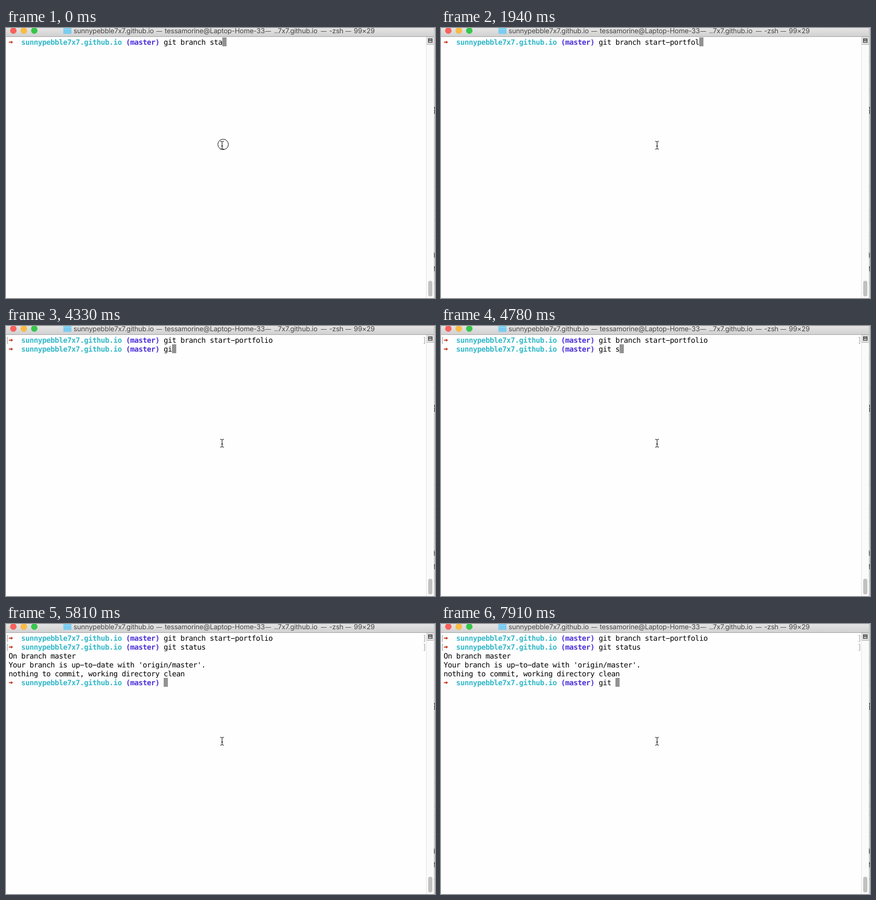
An HTML page that plays this animation: 819x516 px, repeating every 8 s.

```html
<!DOCTYPE html>
<html lang="en">
<head>
<meta charset="utf-8">
<title>Terminal session</title>
<style>
  html, body { margin: 0; width: 100%; height: 100%; overflow: hidden; background: #fefefe; }
  svg { display: block; width: 819px; height: 516px; }
  text { white-space: pre; text-rendering: geometricPrecision; }
  .title text { font: 13px Inter, Roboto, sans-serif; letter-spacing: -.14px; fill: #454545; }
  .title .dash { font-size: 11px; }
  .screen text { font: 14px "DejaVu Sans Mono", monospace; fill: #000; }
  .screen .dir { font-weight: bold; fill: #33b8c8; }
  .screen .git { font-weight: bold; fill: #4a2fd8; }
  .mark { fill: none; stroke: #999; }
</style>
</head>
<body>
<svg viewBox="0 0 819 516">
  <defs>
    <linearGradient id="bar" x2="0" y2="1">
      <stop stop-color="#e4e4e4"/><stop offset="1" stop-color="#d1d1d1"/>
    </linearGradient>
  </defs>
  <rect width="819" height="516" fill="#fefefe"/>

  <!-- sliver of the window behind -->
  <rect x="817" width="2" height="516" fill="#d9d9d9"/>
  <path d="M817.5 0V516" stroke="#b9b9b9"/>
  <path d="M818 64.5h1M818 117.5h1M818 303.5h1M818 349.5h1M818 366.5h1M818 397.5h1M818 405.5h1M818 487.5h1" stroke="#999"/>
  <path d="M817 151.5h2M818.5 152v4M817 157.5h2M818.5 158v5M817 163h2M817.5 429v9M817 433.5h2M817 438h2M817 457.5h2M818 455v10" stroke="#333" fill="none"/>

  <g class="title">
    <rect width="817" height="16" fill="url(#bar)"/>
    <path d="M0 16.5H817" stroke="#a4a4a4"/>
    <g stroke-width=".6">
      <circle cx="14" cy="5" r="5.8" fill="#fc605b" stroke="#e8544f"/>
      <circle cx="34" cy="5" r="5.8" fill="#fdbc40" stroke="#e8aa38"/>
      <circle cx="54" cy="5" r="5.8" fill="#34c84a" stroke="#2db53f"/>
    </g>
    <path d="M109.5 0H125V10Q125 11.2 123.8 11.2H110.7Q109.5 11.2 109.5 10Z" fill="#7accf0"/>
    <path d="M109.5 2.5H125" stroke="#9addf7"/>
  </g>

  <g>
    <path d="M802.5 17V516" stroke="#e3e3e3"/>
    <rect x="803" y="17" width="14" height="499" fill="#fafafa"/>
    <rect x="803" y="17" width="14" height="14" fill="#dedede"/>
    <path d="M803 31.5H817" stroke="#b8b8b8"/>
    <rect x="806.5" y="20.5" width="7" height="7" fill="#dedede" stroke="#222"/>
    <path d="M807 22.5H813M807 24.5H813" stroke="#222"/>
    <rect x="806" y="483" width="8" height="30" rx="4" fill="#c1c1c1"/>
  </g>

  <g class="screen"></g>

  <g fill="none" stroke="#000">
    <circle id="ring" cx="414.5" cy="222.5" r="10" fill="#fff"/>
    <path d="M409 216.5H410.5Q412.5 216.5 412.5 218.5V229.5Q412.5 231.5 410.5 231.5H409M416 216.5H414.5Q412.5 216.5 412.5 218.5M412.5 229.5Q412.5 231.5 414.5 231.5H416M411 225.5H414"/>
  </g>
</svg>
<script>
const LOOP = 8000, CELL = 8, ROW = 17, LEFT = 5, TOP = 18;
const PROMPT_COLS = 37;
const SITE = 'sunnypebble7x7.github.io';
const RING_UNTIL = 150;

const titleParts = [
  [129, SITE], [287, '—'], [303, 'tessamorine@Laptop-Home-33'], [495, '—'],
  [512, '..7x7.github.io'], [601, '—'], [617, '-zsh'], [648, '—'], [664, '99×29']
];

// keys: [time, typed characters]; enter: return pressed; done: next prompt shown
const commands = [
  { row: 0, text: 'git branch start-portfolio', shown: 0, enter: 2690, done: 2840, output: [],
    keys: [[0, 14], [150, 15], [300, 16], [450, 17], [1050, 18], [1200, 20], [1350, 21],
           [1650, 23], [1940, 24], [2090, 25], [2240, 26]] },
  { row: 1, text: 'git status', shown: 2840, enter: 5660, done: 5810,
    output: ['On branch master', "Your branch is up-to-date with 'origin/master'.",
             'nothing to commit, working directory clean'],
    keys: [[4330, 2], [4480, 3], [4630, 4], [4770, 5], [4920, 6], [5070, 7], [5210, 9], [5360, 10]] },
  { row: 5, text: 'git ', shown: 5810, enter: Infinity, done: Infinity, output: [],
    keys: [[7460, 1], [7610, 2], [7760, 3], [7910, 4]] }
];

function add(parent, tag, attrs = {}, content = '') {
  const el = document.createElementNS('http://www.w3.org/2000/svg', tag);
  for (const name in attrs) el.setAttribute(name, attrs[name]);
  el.textContent = content;
  return parent.appendChild(el);
}

const show = (el, on) => el.setAttribute('visibility', on ? 'visible' : 'hidden');
const colX = col => LEFT + col * CELL;
const rowY = row => TOP + row * ROW;
const wideDash = content => content.replace(/-/g, '−');

// One glyph per terminal cell
function addCells(parent, row, col, content, cls = '') {
  const xs = [...content].map((_, i) => colX(col + i)).join(' ');
  return add(parent, 'text', { x: xs, y: rowY(row) + 14, class: cls }, wideDash(content));
}

const title = document.querySelector('.title');
for (const [x, part] of titleParts) {
  add(title, 'text', { x, y: 10, class: part === '—' ? 'dash' : '' }, part);
}

const screen = document.querySelector('.screen');
const cursor = add(screen, 'rect', { width: CELL, height: ROW, fill: '#929292' });
const ring = document.getElementById('ring');

for (const cmd of commands) {
  const y = rowY(cmd.row);
  cmd.prompt = add(screen, 'g');
  add(cmd.prompt, 'path', { d: `M5.5 ${y + 8.3}h4v-2l4 2.8l-4 2.8v-2h-4z`, fill: '#c33720' });
  addCells(cmd.prompt, cmd.row, 3, SITE, 'dir');
  addCells(cmd.prompt, cmd.row, 28, '(master)', 'git');
  cmd.line = addCells(screen, cmd.row, PROMPT_COLS, cmd.text);
  cmd.marks = add(screen, 'path', {
    class: 'mark',
    d: `M4 ${y + 3.5}h-1.5v12h1.5M797.5 ${y + 3.5}h2v12h-2`
  });
  cmd.result = add(screen, 'g');
  cmd.output.forEach((line, i) => addCells(cmd.result, cmd.row + 1 + i, 0, line));
}

function draw(t) {
  show(ring, t < RING_UNTIL);
  for (const cmd of commands) {
    const typed = cmd.keys.reduce((n, [at, count]) => t >= at ? count : n, 0);
    show(cmd.prompt, t >= cmd.shown);
    show(cmd.marks, t >= cmd.enter);
    show(cmd.result, t >= cmd.done);
    cmd.line.textContent = wideDash(cmd.text.slice(0, typed));
    if (t >= cmd.shown) {
      const entered = t >= cmd.enter;
      cursor.setAttribute('x', colX(entered ? 0 : PROMPT_COLS + typed));
      cursor.setAttribute('y', rowY(cmd.row + (entered ? 1 : 0)));
    }
  }
}

const start = performance.now();
function tick() {
  draw((performance.now() - start) % LOOP);
  requestAnimationFrame(tick);
}
tick();
</script>
</body>
</html>
```
